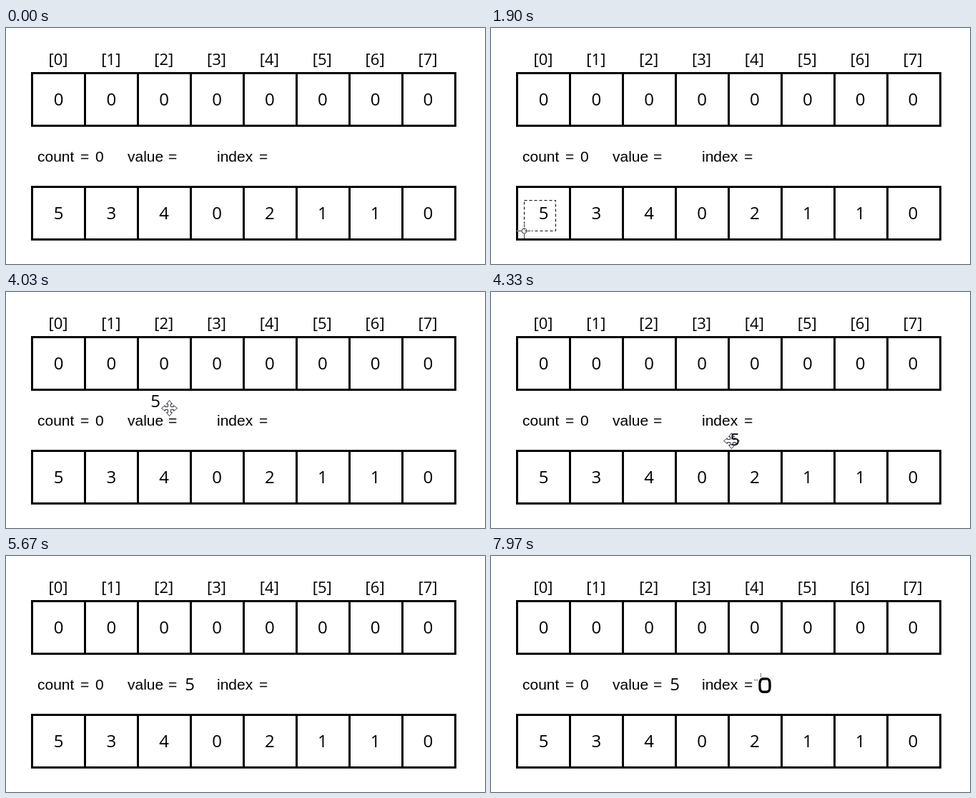
Write an HTML page with a canvas that moves like this. It is 670 by 332 pixels and loops after 8 s.

```html
<!DOCTYPE html>
<html lang="en">
<head>
<meta charset="utf-8">
<title>Counting sort steps</title>
<style>
html, body { margin: 0; width: 100%; height: 100%; overflow: hidden; background: #fff; }
canvas { display: block; }
</style>
</head>
<body>
<canvas id="stage" width="670" height="332"></canvas>
<script>
const ctx = document.getElementById('stage').getContext('2d');
const LOOP = 8000;
const CELL = 74, LEFT = 36.5;
const DIGITS = '24px "Open Sans", "Noto Sans", sans-serif';
const LABELS = '22px "Open Sans", "Noto Sans", sans-serif';
const WORDS = '21px "Liberation Sans", Arial, sans-serif';

const mix = (a, b, k) => a + (b - a) * k;
const clamp = k => Math.min(1, Math.max(0, k));
const smooth = k => k * k * (3 - 2 * k);
const linear = k => k;

// A trip eases the pointer between two places; it shows from start to end.
const trip = (kind, start, end, from, to, ease = smooth) => ({ kind, start, end, from, to, ease });
const drag = trip(cross, 1470, 1850, [91, 242], [46, 285]);
const carry = [
  trip(move, 3900, 4200, [11, 77], [354, 213], k => Math.sin(k * Math.PI / 2)),
  trip(move, 4200, 4700, [354, 213], [250, 187]),
  trip(move, 4700, 4870, [250, 187], [256, 182]),
  trip(move, 4870, 5170, [256, 182], [256, 182])
];
const trips = [
  trip(cross, 600, 1070, [73, 326], drag.from),
  trip(cross, 1070, 1470, drag.from, drag.from),
  drag,
  trip(cross, 1850, 2300, drag.to, [58, 276]),
  trip(move, 2300, 2480, [58, 276], [76, 262]),
  trip(cross, 2480, 2820, [76, 262], [-10, 126]),
  ...carry,
  trip(cross, 5170, 5300, [256, 182], [193, 54]),
  trip(dots, 6100, 6560, [325, 14], [387, 192]),
  trip(dots, 6560, 6830, [387, 192], [378, 177]),
  trip(dots, 6830, 6970, [378, 177], [378, 177]),
  trip(dots, 7000, 7230, [378, 177], [377, 174])
];

const active = (t, list) => list.find(s => t >= s.start && t < s.end);

function place({ start, end, from, to, ease }, t) {
  const k = ease(clamp((t - start) / (end - start)));
  return from.map((a, i) => Math.round(mix(a, to[i], k)));
}

function text(s, x, y, font, align = 'center') {
  ctx.font = font;
  ctx.textAlign = align;
  ctx.fillText(s, x, y);
}

function lines(...segments) {
  ctx.beginPath();
  for (const [x0, y0, x1, y1] of segments) {
    ctx.moveTo(x0, y0);
    ctx.lineTo(x1, y1);
  }
  ctx.stroke();
}

const column = i => 73.5 + 73.85 * i;

function row(values, top) {
  ctx.lineWidth = 3;
  ctx.strokeRect(LEFT, top, CELL * 8, 74);
  [...values].forEach((v, i) => {
    const x = LEFT + CELL * i;
    if (i) lines([x, top, x, top + 74]);
    text(v, column(i), top + 45.5, DIGITS);
  });
}

function variable(name, x, rest, restX) {
  text(name, x, 188, WORDS, 'left');
  text(rest, restX, 188, WORDS, 'left');
}

function board() {
  for (let i = 0; i < 8; i++) text(`[${i}]`, column(i) - 0.5, 52, LABELS);
  row('00000000', 63.5);
  row('53402110', 223.5);
  ctx.wordSpacing = '3px';
  variable('count', 44, '= 0', 104);
  variable('value', 170, '=', 227);
  variable('index', 295, '=', 354);
  ctx.wordSpacing = '0px';
}

function selection(x0, y0, x1, y1) {
  ctx.lineWidth = 1;
  ctx.setLineDash([4, 3]);
  ctx.strokeRect(x0 + 0.5, y0 + 0.5, x1 - x0, y1 - y0);
  ctx.setLineDash([]);
}

function arms(inner, outer) {
  lines([-outer, 0, -inner, 0], [inner, 0, outer, 0], [0, -outer, 0, -inner], [0, inner, 0, outer]);
}

function cross() {
  ctx.globalCompositeOperation = 'difference';
  ctx.strokeStyle = '#ccc';
  arms(3.5, 10.5);
  ctx.beginPath();
  ctx.arc(0, 0, 3.5, 0, 7);
  ctx.stroke();
}

function dots() {
  ctx.globalCompositeOperation = 'difference';
  ctx.strokeStyle = '#fff';
  ctx.setLineDash([1, 1]);
  arms(4.5, 9.5);
}

function move() {
  ctx.beginPath();
  for (let i = 0; i < 4; i++) {
    for (const [x, y] of [[-2, -2], [-2, -6], [-4, -6], [0, -11], [4, -6], [2, -6]]) ctx.lineTo(x, y);
    ctx.rotate(Math.PI / 2);
  }
  ctx.closePath();
  ctx.strokeStyle = '#334';
  ctx.stroke();
}

function pointer(kind, x, y) {
  ctx.save();
  ctx.translate(x + 0.5, y + 0.5);
  ctx.lineWidth = 1;
  kind();
  ctx.restore();
}

// Handwritten zero: a squarish oval from the upper left, anticlockwise.
function pen(k) {
  const a = Math.PI * (1.25 - 2 * k);
  const bulge = v => Math.sign(v) * Math.abs(v) ** 0.6;
  return [383 + 7 * bulge(Math.cos(a)), 182 + 9.3 * bulge(Math.sin(a))];
}

function write(p) {
  ctx.save();
  ctx.beginPath();
  for (let k = 0; k < p; k += 0.01) ctx.lineTo(...pen(k));
  ctx.lineTo(...pen(p));
  ctx.lineWidth = 3.4;
  ctx.lineCap = ctx.lineJoin = 'round';
  ctx.stroke();
  ctx.restore();
  pointer(dots, ...pen(p).map(Math.round));
}

function draw(t) {
  ctx.fillStyle = '#fff';
  ctx.fillRect(0, 0, 670, 332);
  ctx.fillStyle = ctx.strokeStyle = '#000';
  board();

  if (t >= drag.start && t < 3000) {
    const [x, y] = place(drag, t);
    selection(x, 242, 90, y);
  }
  if (t >= carry[0].start) {
    // The copied digit trails slightly behind the pointer.
    const late = t - 14;
    const [x, y] = place(active(late, carry) || carry[late < carry[0].start ? 0 : 3], late);
    text('5', x + 1, y + 7, DIGITS);
  }
  if (t >= 5170 && t < 5670) selection(233, 160, 277, 203);
  if (t >= 7230) write(clamp((t - 7230) / 730));

  const now = active(t, trips);
  if (now) pointer(now.kind, ...place(now, t));
}

const start = performance.now();
function tick() {
  draw((performance.now() - start) % LOOP);
  requestAnimationFrame(tick);
}
tick();
</script>
</body>
</html>
```
